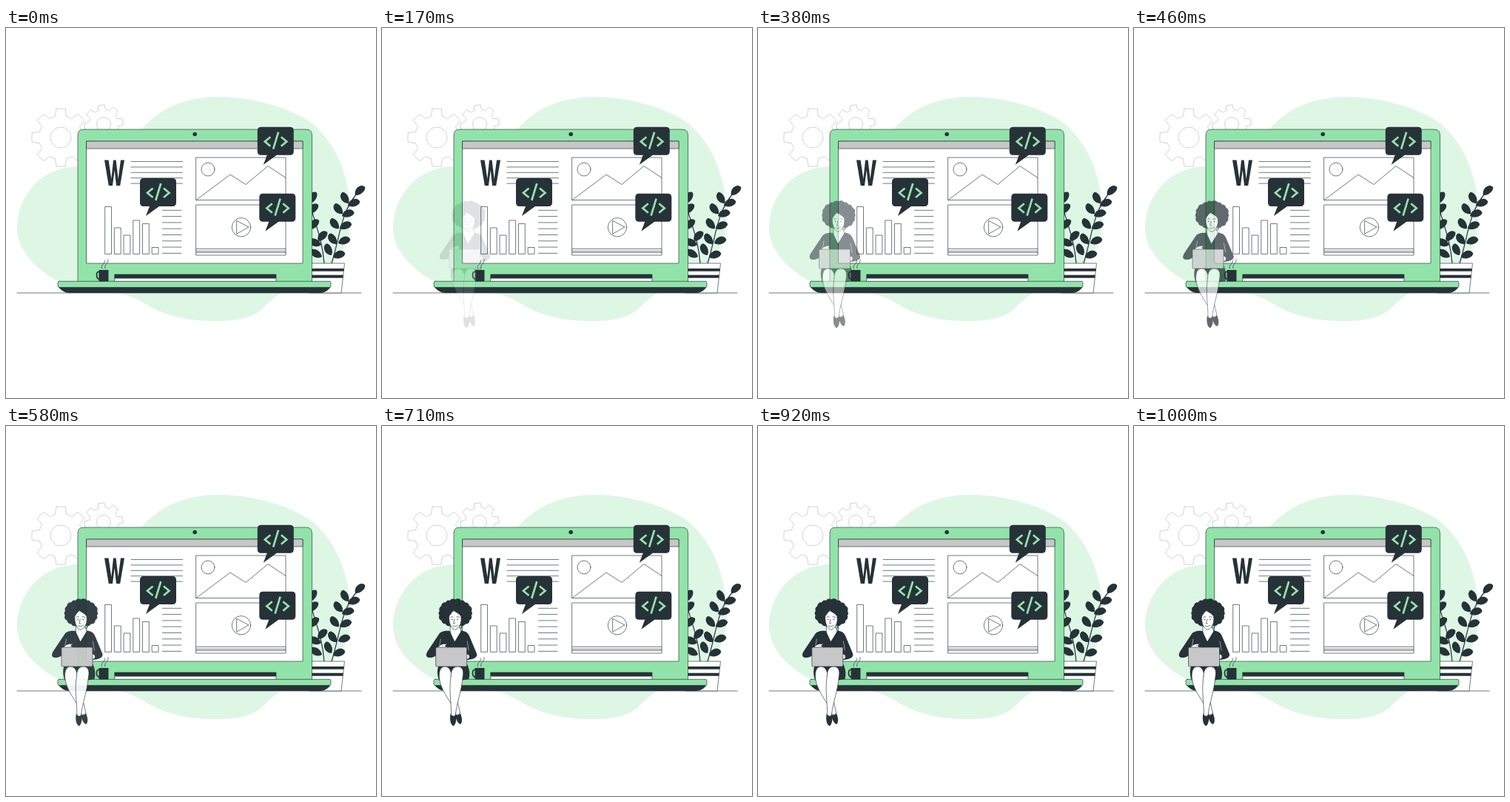
An HTML page that plays this animation: 500x500 px, repeating every 1.04 s.

```html
<!DOCTYPE html>
<html lang="en">
<head>
<meta charset="utf-8">
<title>Web design</title>
<style>
html, body { margin: 0; width: 100%; height: 100%; overflow: hidden; background: #fff; }
svg { display: block; width: 100vw; height: 100vh; }
.ln { fill: none; stroke: #263238; stroke-width: .65; stroke-linejoin: round; stroke-linecap: round; }
.w { fill: #fff; }
.g { fill: #92e3a9; }
.gr { fill: #c7c7c7; }
.d { fill: #263238; }
#gears { fill: none; stroke: #c7c7c7; stroke-width: .8; stroke-linejoin: round; }
</style>
</head>
<body>
<svg viewBox="0 0 500 500">
  <defs>
    <g id="bubble">
      <path class="d" d="M5 0H44Q49 0 49 5V33Q49 38 44 38H26L8 51L13 38H5Q0 38 0 33V5Q0 0 5 0Z"/>
      <path d="M17.5 13.5L10 19.7L17.5 26M28.3 7L21.3 30M32 13.5L39.5 19.7L32 26" fill="none" stroke="#92e3a9" stroke-width="2.7"/>
    </g>
    <path id="leaf" d="M0 0C2-4 7-7 12-5.5C16-4.5 17.5-1 17 1C14 5 5 5.500 0 0Z"/>
  </defs>

  <path fill="#def7e5" d="M183 137C210 105 248 93 287 93C330 93 382 106 414 129C453 162 467 215 466 264C463 302 440 325 405 341C378 353 363 362 348 378C332 394 307 396 283 396C245 396 216 389 192 375C168 360 150 356 125 355C98 353 68 346 45 325C22 305 14 286 15 266C18 222 50 188 97 187Z"/>
  <g id="gears"></g>
  <path class="ln" d="M15 358H480" stroke-width=".8"/>

  <g id="plant" class="d">
    <path class="ln" style="stroke-width:1.2" d="M440 318C452 280 452 250 474 224M430 318C428 288 418 265 410 236"/>
  </g>
  <path class="ln w" d="M405 318H457.500L453 358H410Z"/>
  <path class="d" d="M405 325H456.700L456.300 328.700H405ZM405 333.700H455.700L455.200 337.700H405Z"/>

  <!-- big laptop -->
  <path class="ln g" d="M97 343V145Q97 137 105 137H405.500Q413.500 137 413.500 145V343Z"/>
  <path class="ln w" d="M109 153H401V318H109Z"/>
  <path class="ln gr" d="M109 153H401V163H109Z"/>
  <circle class="d" cx="255.200" cy="143.500" r="2.800"/>
  <path class="ln w" d="M147 333H365V342.500H147Z"/>
  <path class="d" d="M147 333H365V338.500H147Z"/>
  <path class="d" d="M71 350H438.500C436 354 431 358 425 358H85C79 358 74 354 71 350Z"/>
  <rect class="ln g" x="70" y="342.300" width="369" height="8.200" rx="2"/>

  <!-- page on the screen -->
  <path class="d" d="M133 178.500H138.600L142.400 204L145 178.500H148.600L151.600 204L155 178.500H160L154.200 213H149L146.700 192L144 213H138.800Z"/>
  <path id="page" class="ln"/>
  <path class="ln w" d="M257 175H378V232.500H257ZM257 239H378V307H257Z"/>
  <path class="ln" d="M257 232.500L303 198L324 211.500L354 186.500L378 202.500M257 298.500H378M257 301.500H378M257 303.500H378M312 260.500L328 269L312 278Z"/>
  <circle class="ln" cx="273" cy="191" r="9"/>
  <circle class="ln" cx="318" cy="269.300" r="12.700"/>
  <use href="#bubble" x="181" y="203"/>
  <use href="#bubble" x="339.800" y="133.700"/>
  <use href="#bubble" x="342.300" y="223.700"/>

  <!-- mug -->
  <path class="d" d="M125.500 327H138.500V341.500Q138.500 342.500 137.500 342.500H126.500Q125.500 342.500 125.500 341.500Z"/>
  <path class="ln" style="stroke-width:1.700" d="M126 329.500H124.500Q122.500 330 122.500 334Q122.500 338.500 126 339.500"/>
  <path class="ln" d="M129.500 325C127 320 134.500 319 133.500 314M134 325C131.500 320 139.500 318 138 312.500"/>

  <g id="woman" opacity="0">
    <!-- skirt, legs, shoes -->
    <path class="d" d="M78 322H116C119 328 120 336 118 342L109 343.500H78C75 337 75 328 78 322Z"/>
    <path class="d" d="M99.500 390C100 387 106 386 107 389C109 394 110 400 107 403C103 402 101 396 99.500 390Z"/>
    <path class="ln w" d="M78.500 343C77 331 80 325 86 325C91 325 94 330 95 338L106.500 388Q104 392 100.500 390C98 376 82 362 78.500 343Z"/>
    <path class="ln w" d="M94 338C94 329 98 325 103 325C109 325 112 330 110 339C108 360 102 373 100 391Q97 394 94.500 390C94.500 374 91 357 94 338Z"/>
    <path class="d" d="M93.500 388C94 393 100 393 100.500 389.500C102 395 101 403 97.500 405.500C93 404 92 395 93.500 388Z"/>
    <!-- hair and head -->
    <g id="hair" class="d"><ellipse cx="100" cy="253" rx="20" ry="17"/></g>
    <path class="ln w" d="M93 271V280L99 292L108 279L105 268Z"/>
    <path class="ln w" d="M91.500 257C94 254 95 251 98 249.500C101 252 105 253 107.500 257C109 265 106 273 99.500 275.500C94 274 91 266 91.500 257Z"/>
    <path class="ln" d="M93.500 258.500Q95 257 97 258M101.500 258Q103.500 257 105.500 258.500M98.700 261L97.500 267H99.500M96 270Q99 272.500 103 269.500"/>
    <circle class="d" cx="95.500" cy="261.500" r=".8"/>
    <circle class="d" cx="103" cy="261.500" r=".8"/>
    <circle class="ln g" cx="107" cy="271.500" r="1.900"/>
    <!-- jacket, arms, small laptop -->
    <path class="d" d="M92.500 277L99 291.500L108 276.500C113 277 117 279 119 284L129 308C130 312 126 315 117 316L76 318L77 308C74 311 69 313.500 64 313C60 312 60 309 62 305L78 281C81 277 87 276.500 92.500 277Z"/>
    <path class="ln" style="stroke:#fff;stroke-width:.5" d="M80 288L77 306M116 291L118 303"/>
    <path class="ln w" d="M76 300C78 296 82 294 89 294.500L86 297L90 300Z"/>
    <path class="ln w" d="M114 308Q119 308 119 312Q118 316 114 315Z"/>
    <rect class="ln gr" x="73.500" y="299" width="42" height="26" rx="1.200"/>
  </g>
</svg>
<script>
const $ = id => document.getElementById(id);
const add = (id, markup) => $(id).insertAdjacentHTML('beforeend', markup);

// Eight-toothed wheel: tip radius R, body radius r, half widths of tooth tip and root.
function gear(x, y, turn, R, r, tip, root, hole) {
  let d = '';
  for (let i = 0; i < 8; i++) {
    const a = (i * 45 + turn) * Math.PI / 180, c = Math.cos(a), s = Math.sin(a);
    const at = (u, v) => `${x + u * c - v * s} ${y + u * s + v * c}`;
    d += `${i ? `A${r} ${r} 0 0 1 ` : 'M'}${at(r, -root)}L${at(R, -tip)}L${at(R, tip)}L${at(r, root)}`;
  }
  add('gears', `<path d="${d}Z"/><circle cx="${x}" cy="${y}" r="${hole}"/>`);
}
gear(74, 148, 0, 39, 28.5, 6, 7.6, 14);
gear(132, 130, -7, 26, 19, 4.2, 5.3, 9.5);

// Leaves: root x, root y, direction in degrees
[[472, 226, -42], [463, 237, -120], [462, 240, -20], [455, 251, -128], [454, 254, -17],
 [450, 271, -128], [451, 271, -22], [447, 292, -125], [449, 291, -20], [440, 307, -115],
 [442, 310, -20], [411, 237, -62], [410, 251, -48], [411, 272, -48], [422, 288, -47],
 [426, 293, -155], [427, 309, -148]
].forEach(([x, y, a]) =>
  add('plant', `<use href="#leaf" transform="translate(${x} ${y}) rotate(${a})"/>`));

// Text rules and bar chart
let page = '';
for (let i = 0; i < 5; i++) page += `M169 ${180.5 + i * 7.4}H238.5`;
for (let i = 0; i < 8; i++) page += `M211.500 ${246.3 + i * 8.3}H237`;
[241.5, 270, 280, 260, 264.5, 296.5].forEach((y, i) => {
  page += `M${133.7 + i * 12.7} 305V${y}h8.800V305Z`;
});
$('page').setAttribute('d', page);

for (let i = 0; i < 18; i++) {
  const a = i * Math.PI / 9;
  add('hair', `<circle cx="${100 + 18.3 * Math.cos(a)}" cy="${253 + 15 * Math.sin(a)}" r="${4.4 + i % 3 * .35}"/>`);
}

// Cubic easing with a slight overshoot, solved by bisection
function ease(u) {
  const curve = (s, a, b) => 3 * (1 - s) ** 2 * s * a + 3 * (1 - s) * s * s * b + s ** 3;
  let lo = 0, hi = 1;
  for (let i = 0; i < 30; i++) {
    const mid = (lo + hi) / 2;
    if (curve(mid, .36, .5) < u) lo = mid; else hi = mid;
  }
  return curve(lo, -.01, 1.38);
}

const LOOP = 1040, FPS = 24, SLIDE = 20;
function draw() {
  const t = performance.now() % LOOP;
  const step = Math.floor((t + 5) * FPS / 1000);
  const p = step < 2 ? 0 : ease(Math.min(1, (step + .75) / FPS));
  $('woman').setAttribute('transform', `translate(${SLIDE * (1 - p)} 0)`);
  $('woman').setAttribute('opacity', Math.min(1, p));
  requestAnimationFrame(draw);
}
draw();
</script>
</body>
</html>
```
